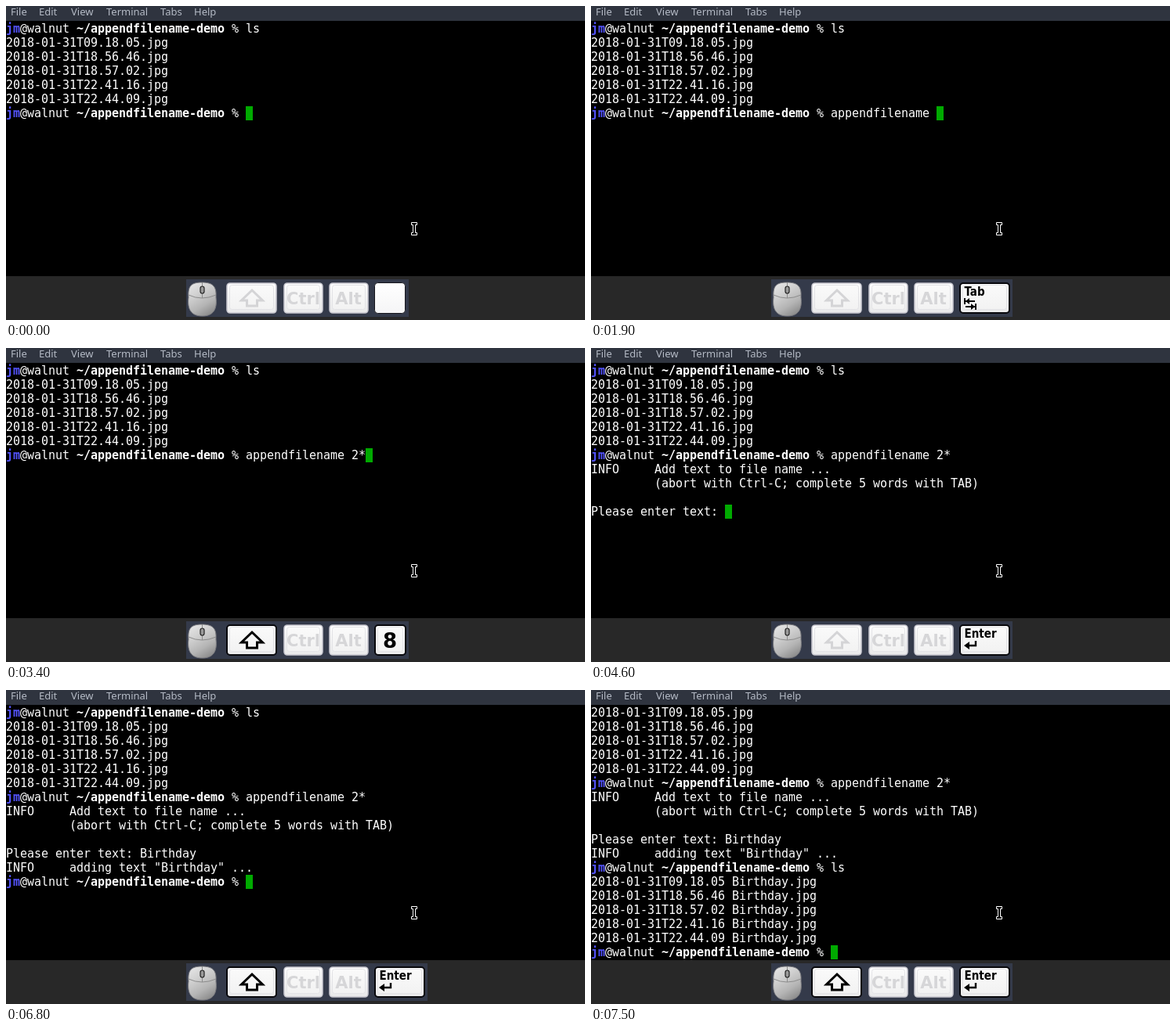
These frames come from a looping animation (739x401 px, 8 s). An HTML page with a canvas:

```html
<!DOCTYPE html>
<html lang="en">
<head>
<meta charset="utf-8">
<title>appendfilename demo</title>
<style>
html, body { margin: 0; width: 100%; height: 100%; overflow: hidden; background: #000; }
canvas { display: block; }
</style>
</head>
<body>
<canvas id="stage" width="739" height="401"></canvas>
<script>
const ctx = document.getElementById('stage').getContext('2d');
const LOOP = 8000;
const CELL = 9, LINE = 18, TOP = 20, ASCENT = 14, ROWS = 18;
const MONO = '15px "DejaVu Sans Mono", monospace';
const SANS = '"DejaVu Sans", sans-serif';

const USER = 'jm', HOST = '@walnut ', PATH = '~/appendfilename-demo';
const PROMPT = USER + HOST + PATH + ' % ';
const STAMPS = ['09.18.05', '18.56.46', '18.57.02', '22.41.16', '22.44.09'];
const listing = suffix => STAMPS.map(s => `2018-01-31T${s}${suffix}.jpg`);

const BASE = [PROMPT + 'ls', ...listing('')];
const COMMAND = [...BASE, PROMPT + 'appendfilename 2*'];
const ASK = [...COMMAND,
  'INFO     Add text to file name ...',
  '         (abort with Ctrl-C; complete 5 words with TAB)',
  ''];
const DONE = [...ASK, 'Please enter text: Birthday', 'INFO     adding text "Birthday" ...'];
const RENAMED = [...DONE, PROMPT + 'ls', ...listing(' Birthday'), PROMPT];

const shell = typed => [...BASE, PROMPT + typed];
const answer = typed => [...ASK, 'Please enter text: ' + typed];
const after = typed => [...DONE, PROMPT + typed];

// time, terminal lines, pressed key, shift held
const STEPS = [
  [0, shell(''), '', 0],
  [800, shell('a'), 'A', 0],
  [1200, shell('ap'), 'P', 0],
  [1300, shell('app'), 'P', 0],
  [1400, shell('app'), 'E', 0],
  [1600, shell('appe'), 'E', 0],
  [1700, shell('appen'), 'N', 0],
  [1800, shell('append'), 'D', 0],
  [1900, shell('appendfilename '), 'Tab', 0],
  [2700, shell('appendfilename '), '', 0],
  [3000, shell('appendfilename '), '2', 0],
  [3100, shell('appendfilename 2'), '2', 0],
  [3300, shell('appendfilename 2'), '2', 1],
  [3400, COMMAND, '8', 1],
  [4300, COMMAND, '', 0],
  [4500, [...COMMAND, ''], 'Enter', 0],
  [4600, answer(''), 'Enter', 0],
  [5100, answer(''), 'Enter', 1],
  [5300, answer('B'), 'B', 1],
  [5400, answer('Bi'), 'I', 1],
  [5500, answer('Bir'), 'R', 1],
  [5700, answer('Birt'), 'T', 1],
  [5800, answer('Birth'), 'H', 1],
  [6000, answer('Birthd'), 'D', 1],
  [6100, answer('Birthda'), 'A', 1],
  [6200, answer('Birthday'), 'Y', 1],
  [6800, after(''), 'Enter', 1],
  [7200, after('l'), 'L', 1],
  [7300, after('ls'), 'S', 1],
  [7400, [...after('ls'), ''], 'Enter', 1],
  [7500, RENAMED, 'Enter', 1]
];

function rect(x, y, w, h, fill) {
  ctx.fillStyle = fill;
  ctx.fillRect(x, y, w, h);
}

function label(text, x, y, font, fill, align = 'left') {
  ctx.font = font;
  ctx.fillStyle = fill;
  ctx.textAlign = align;
  ctx.fillText(text, x, y);
}

function box(x, y, w, h, r, fill, stroke, width = 1) {
  ctx.beginPath();
  ctx.roundRect(x, y, w, h, r);
  if (fill) { ctx.fillStyle = fill; ctx.fill(); }
  if (stroke) { ctx.strokeStyle = stroke; ctx.lineWidth = width; ctx.stroke(); }
}

function path(points, stroke, width, fill, closed = true) {
  ctx.beginPath();
  points.forEach(([x, y]) => ctx.lineTo(x, y));
  if (closed) ctx.closePath();
  if (fill) { ctx.fillStyle = fill; ctx.fill(); }
  if (stroke) { ctx.strokeStyle = stroke; ctx.lineWidth = width; ctx.stroke(); }
}

function gradient(x0, y0, x1, y1, ...colors) {
  const g = ctx.createLinearGradient(x0, y0, x1, y1);
  colors.forEach((c, i) => g.addColorStop(i / (colors.length - 1), c));
  return g;
}

// Every glyph sits on the terminal's whole-pixel grid.
function cells(text, col, row, fill = '#fff', bold = false) {
  const font = (bold ? 'bold ' : '') + MONO;
  [...text].forEach((ch, i) =>
    label(ch, (col + i) * CELL, TOP + row * LINE + ASCENT, font, fill));
}

function terminal(lines) {
  const view = lines.slice(-ROWS);
  view.forEach((line, row) => {
    if (!line.startsWith(PROMPT)) return cells(line, 0, row);
    const host = USER.length, dir = host + HOST.length, rest = dir + PATH.length;
    cells(USER, 0, row, '#5454ff', true);
    cells(HOST, host, row);
    cells(PATH, dir, row, '#fff', true);
    cells(line.slice(rest), rest, row);
  });
  const row = view.length - 1;
  rect(view[row].length * CELL, TOP + row * LINE, CELL, LINE, '#00aa00');
}

function menu() {
  rect(0, 0, 739, 19, '#2f343f');
  const items = { File: 6, Edit: 42, View: 83, Terminal: 128, Tabs: 197, Help: 240 };
  for (const name in items)
    label(name, items[name], 12, '13px "Noto Sans", "Open Sans", sans-serif', '#b4bac5');
}

function pointer() {
  const beam = [[517.5, 276.5], [524.5, 276.5], [524.5, 279.5], [522.5, 279.5],
    [522.5, 289.5], [524.5, 289.5], [524.5, 292.5], [517.5, 292.5],
    [517.5, 289.5], [519.5, 289.5], [519.5, 279.5], [517.5, 279.5]];
  path(beam, '#fff', 1, '#000');
}

function mouse() {
  ctx.beginPath();
  ctx.moveTo(233, 372);
  ctx.bezierCurveTo(232, 358, 236, 353, 250, 353);
  ctx.bezierCurveTo(264, 353, 269, 358, 268, 372);
  ctx.bezierCurveTo(270, 388, 264, 396, 250.5, 396);
  ctx.bezierCurveTo(237, 396, 231, 388, 233, 372);
  ctx.fillStyle = gradient(236, 354, 262, 396, '#e6e6e6', '#d0d0d0', '#b4b4b4', '#858585');
  ctx.fill();
  ctx.strokeStyle = '#77777c';
  ctx.lineWidth = 1;
  ctx.stroke();
  ctx.beginPath();
  ctx.moveTo(233, 369);
  ctx.quadraticCurveTo(250, 377, 268, 369);
  ctx.moveTo(250.5, 353);
  ctx.lineTo(250.5, 373);
  ctx.strokeStyle = '#8c8c8c';
  ctx.stroke();
  box(248, 358, 5, 9, 2.5, '#9a9a9a', '#222', 1.2);
}

function keycap(x, w, active) {
  const face = gradient(0, 354, 0, 392, '#ffffff', '#f4f4f4', '#e9e9ea');
  box(x + 1, 354, w - 2, 38, 4, face, active ? '#08080c' : '#c9c8d0', active ? 2 : 1.6);
  box(x + 4.5, 356.5, w - 9, 31, 3, gradient(0, 356, 0, 388, '#fafafa', '#f2f2f2'), '#e3e3e6');
}

function shiftKey(on) {
  keycap(281, 65, on);
  ctx.lineJoin = 'miter';
  path([[314, 363], [327.5, 376], [320.5, 376], [320.5, 383], [307.5, 383],
    [307.5, 376], [300.5, 376]], on ? '#000' : '#d4d4d6', 3);
}

function enterIcon() {
  path([[491, 374], [491, 380], [482, 380]], '#000', 2.4, null, false);
  path([[476, 380], [483, 375], [483, 385]], null, 0, '#000');
}

function tabIcon() {
  const arrow = (y, d, bar, tail, tip) => {
    rect(bar - 1, y - 4, 2, 8, '#000');
    rect(Math.min(tail, tip), y - 1, Math.abs(tail - tip), 2, '#000');
    path([[tip, y], [tip - 5 * d, y - 4], [tip - 5 * d, y + 4]], null, 0, '#000');
  };
  arrow(377, -1, 477, 490, 478);
  arrow(384, 1, 491, 478, 490);
}

function lastKey(key) {
  if (!key) {
    box(470.5, 353.5, 39, 39, 4, gradient(0, 354, 0, 392, '#fff', '#f5f5f6'), '#17171d');
    return;
  }
  const wide = key.length > 1;
  keycap(470, wide ? 65 : 41, true);
  if (!wide) return label(key, 490, 383, 'bold 26px ' + SANS, '#000', 'center');
  label(key, 476.5, 370, 'bold condensed 15px "DejaVu Sans Condensed", ' + SANS, '#000');
  (key === 'Tab' ? tabIcon : enterIcon)();
}

function keyboard(key, shift) {
  rect(0, 345, 739, 56, '#282828');
  rect(230, 349, key.length > 1 ? 308 : 284, 48, '#343a4a');
  mouse();
  shiftKey(shift);
  for (const [name, x, mid] of [['Ctrl', 354, 379.5], ['Alt', 412, 437]]) {
    keycap(x, 51, false);
    label(name, mid, 381, 'bold 21px ' + SANS, '#d6d6d8', 'center');
  }
  lastKey(key);
}

function draw(now) {
  const t = now % LOOP;
  const [, lines, key, shift] = STEPS.findLast(s => s[0] <= t);
  rect(0, 0, 739, 401, '#000');
  menu();
  terminal(lines);
  pointer();
  keyboard(key, shift);
}

const start = performance.now();
function tick() {
  draw(performance.now() - start);
  requestAnimationFrame(tick);
}
tick();
</script>
</body>
</html>
```
